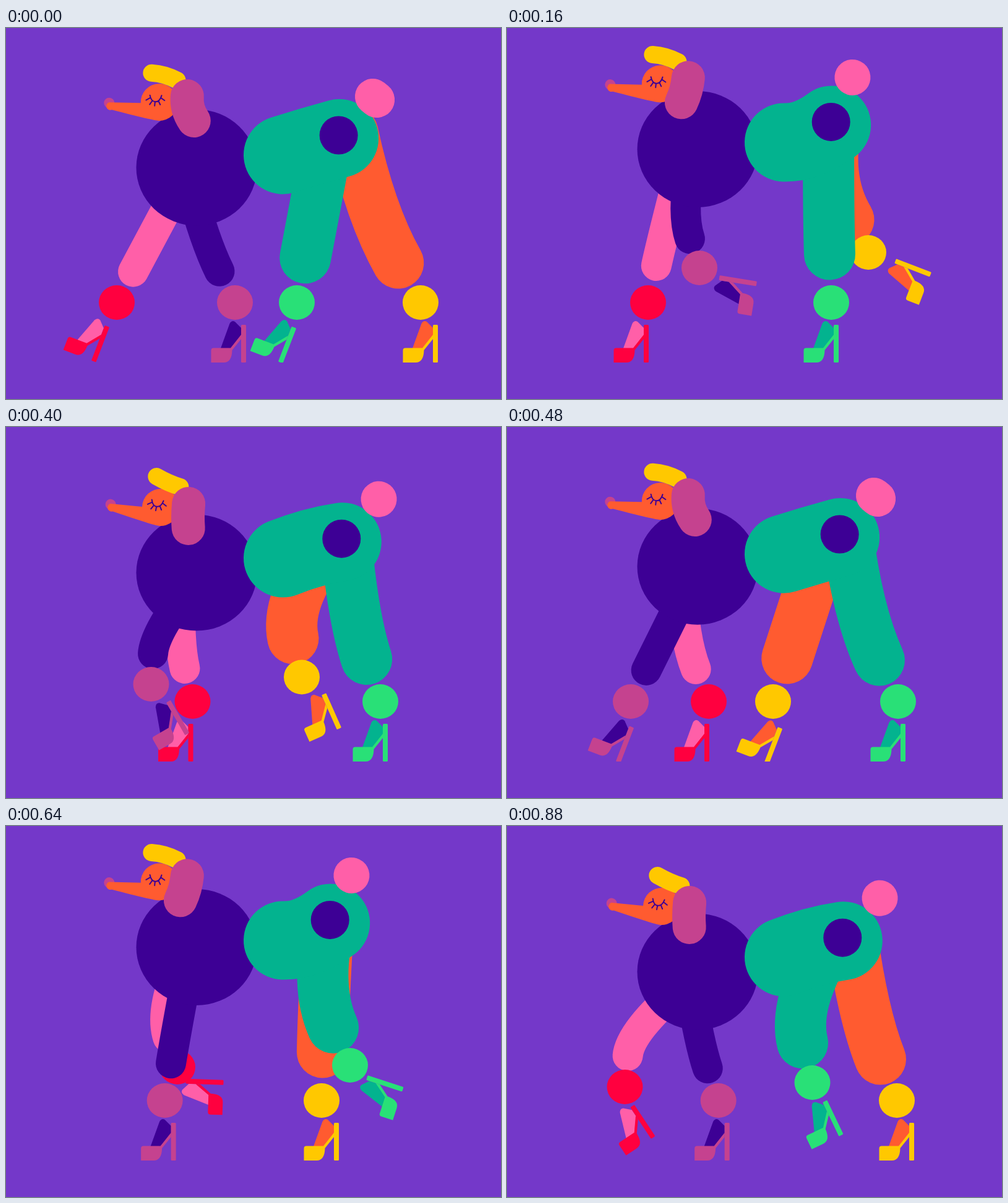
An HTML page with a canvas for the animation above (960 ms loop, 800x600 px).

```html
<!DOCTYPE html>
<html lang="en">
<head>
<meta charset="utf-8">
<title>Strutting poodle</title>
<style>
html, body { margin: 0; width: 100%; height: 100%; overflow: hidden; background: #7438c9; }
canvas { display: block; width: 800px; height: 600px; }
</style>
</head>
<body>
<canvas id="stage" width="800" height="600"></canvas>
<script>
const ctx = document.getElementById('stage').getContext('2d');
const BEAT = 80, STRIDE = 12, BOUNCE = 6, GROUND = 541, BALL_Y = 444;
const C = {
  bg: '#7438c9', indigo: '#3d0095', green: '#03b38f', lime: '#29e077', pink: '#ff5fa8',
  red: '#ff003f', mauve: '#c5428f', orange: '#ff5b30', yellow: '#ffc800'
};

// The foot slides from `from` to `to` on the ground, then swings back through `lift` and `pass`.
const front = { width: 49, reach: 58, follow: 0 };
const hind = { width: 83, reach: 75, follow: 0.17 };
const frontFar = {
  ...front, shift: 0, from: 179, to: 326, lift: [277, 390], pass: [202, 400],
  tuck: 88, ankle: -19, hip: -26, bend: 50, limbFill: C.pink, fill: C.red
};
const frontNear = {
  ...front, shift: 6, from: 200, to: 370, lift: [311, 388], pass: [269, 388],
  tuck: 81, ankle: -2, hip: -12, bend: 34, limbFill: C.indigo, fill: C.mauve
};
const hindFar = {
  ...hind, shift: 6, from: 430, to: 670, lift: [584, 363], pass: [526, 365],
  tuck: 69, ankle: 8, hip: 0, bend: 74, limbFill: C.orange, fill: C.yellow
};
const hindNear = {
  ...hind, shift: 0, from: 470, to: 632, lift: [556, 387], pass: [517, 386],
  tuck: 72, ankle: -8, hip: -4, bend: 68, limbFill: C.green, fill: C.lime
};

const toe = new Path2D('M-36.5 67V47.5Q-36.5 43.5 -32.5 43.5H-5L12 22V29L-2.5 47Q-3 67 -16 67Z');
const heel = new Path2D('M13.5 6H18.5Q20 6 20 7.5V65.5Q20 67 18.5 67H13.5Q12 67 12 65.5V7.5Q12 6 13.5 6Z');
const foot = new Path2D('M-21 44L-6.5 4Q-3 -2 2 1L12 11V23L-5 44Z');
const face = new Path2D('M-81 3H-29.5A30 30 0 1 1 0 31Q-8 31 -76 15A6 6 0 0 1 -81 3Z');
const eye = new Path2D('M-15 -10C-12 4 0 4 4 -10M-21 -2L-14 -6M-15 5L-11 -1M-7 7L-6.5 1M2 5L-1 -1M9 -2L3 -6');

const rad = deg => deg * Math.PI / 180;
const osc = (beat, mean, amp, peak, freq = 1) =>
  mean + amp * Math.cos((beat - peak) * freq * 2 * Math.PI / BOUNCE);

// Linear blend through rows of [time, ...values].
function between(keys, time) {
  const i = keys.findIndex(k => k[0] > time);
  const a = keys[i - 1], b = keys[i];
  const t = (time - a[0]) / (b[0] - a[0]);
  return a.slice(1).map((v, n) => v + (b[n + 1] - v) * t);
}

function ball(x, y, rx, ry, fill) {
  ctx.fillStyle = fill;
  ctx.beginPath();
  ctx.ellipse(x, y, rx, ry, 0, 0, Math.PI * 2);
  ctx.fill();
}

function tube(x0, y0, cx, cy, x1, y1, width, color) {
  ctx.strokeStyle = color;
  ctx.lineWidth = width;
  ctx.beginPath();
  ctx.moveTo(x0, y0);
  ctx.quadraticCurveTo(cx, cy, x1, y1);
  ctx.stroke();
}

function local(x, y, deg, paintAll) {
  ctx.save();
  ctx.translate(x, y);
  ctx.rotate(rad(deg));
  paintAll();
  ctx.restore();
}

function paint(path, fill) {
  ctx.fillStyle = fill;
  ctx.fill(path);
}

function drawLeg(leg, beat, bodyX, hipY) {
  const phase = (beat + leg.shift) % STRIDE;
  const strike = [leg.from, BALL_Y, 21];
  const [x, y, deg] = between([
    [0, ...strike],
    [1, leg.from + (leg.to - leg.from) / 6, BALL_Y, 0],
    [6, leg.to, BALL_Y, 0],
    [8, ...leg.lift, -leg.tuck],
    [10, ...leg.pass, -leg.tuck],
    [STRIDE, ...strike]
  ], phase);

  // The knee bends more and more until the foot passes, then snaps straight.
  const bend = -leg.bend * (phase <= 10 ? (phase / 10) ** 2 : (STRIDE - phase) * 0.75);
  const hipX = bodyX + leg.hip + leg.follow * (x - bodyX);
  const kneeX = (hipX + x) / 2 + bend;
  const kneeY = (hipY + y) / 2 + bend * 0.25;
  const reach = leg.reach - 0.2 * (BALL_Y - y) - osc(beat, 0, 3, 5);
  const pull = reach / Math.hypot(kneeX - x, kneeY - y);
  tube(hipX, hipY, kneeX, kneeY, x + (kneeX - x) * pull, y + (kneeY - y) * pull, leg.width, leg.limbFill);

  const turn = Math.sin(rad(deg));
  local(x + leg.ankle - 26 * turn, y + 30 + 0.45 * leg.ankle * turn, deg, () => {
    paint(foot, leg.limbFill);
    paint(toe, leg.fill);
    paint(heel, leg.fill);
  });
  ball(x, y, 29, 28, leg.fill);
}

function drawHead(beat, chestY) {
  const lag = osc(beat, 0, 1, 4);
  const x = 248.5 + 2.3 * lag, y = chestY - 106.7;
  local(x, y, 3.4 + 4.3 * lag, () => {
    ball(-80.5, 4, 8.5, 8.5, C.mauve);
    paint(face, C.orange);
    ctx.strokeStyle = C.indigo;
    ctx.lineWidth = 2;
    ctx.stroke(eye);
    tube(-12 + 2 * lag, -47 - 2 * lag, 9, -42 + 6 * lag, 28.5, -35, 28, C.yellow);
  });
  const earX = x + 45.5, earY = y - 7 + 4 * lag;
  tube(earX, earY, earX - 2, earY + 21, earX + osc(beat, -5.7, 17, 0.2), earY + 40, 54, C.mauve);
}

function drawTail(beat, rumpX, rumpY) {
  const x = rumpX + osc(beat, 47.5, 13.8, -0.63), y = rumpY + osc(beat, -73, 8, 0);
  const stretch = Math.max(0.01, osc(beat, 5, 6, 3.7, 2));
  const dx = 0.55 * stretch, dy = 0.45 * stretch;
  tube(x - dx, y - dy, x, y, x + dx, y + dy, 58, C.pink);
}

function draw(beat) {
  const chestX = 308, chestY = osc(beat, 215.8, 19.8, 5);
  const rumpX = osc(beat, 533, 9.3, 5), rumpY = osc(beat, 171.3, 14.4, 5);
  const loinX = 447.5, loinY = osc(beat, 198.5, 13.5, 5);
  const sag = osc(beat, 4.5, 10.5, 2);

  ctx.fillStyle = C.bg;
  ctx.fillRect(0, 0, 800, 600);
  ctx.save();
  ctx.beginPath();
  ctx.rect(0, 0, 800, GROUND);
  ctx.clip();
  ctx.lineCap = 'round';

  drawLeg(frontFar, beat, chestX, chestY + 25);
  drawLeg(frontNear, beat, chestX, chestY + 25);
  ball(chestX, chestY, 97.5, 94, C.indigo);
  drawHead(beat, chestY);

  drawLeg(hindFar, beat, rumpX, rumpY - 10);
  drawLeg(hindNear, beat, rumpX, rumpY - 10);
  tube(loinX, loinY, (loinX + rumpX) / 2, (loinY + rumpY) / 2 + sag, rumpX + 1, rumpY, 127, C.green);
  ball(rumpX, rumpY - 5, 31, 31, C.indigo);
  drawTail(beat, rumpX, rumpY);
  ctx.restore();
}

const start = performance.now();
function tick() {
  draw(Math.floor((performance.now() - start) / BEAT) % STRIDE);
  requestAnimationFrame(tick);
}
tick();
</script>
</body>
</html>
```
